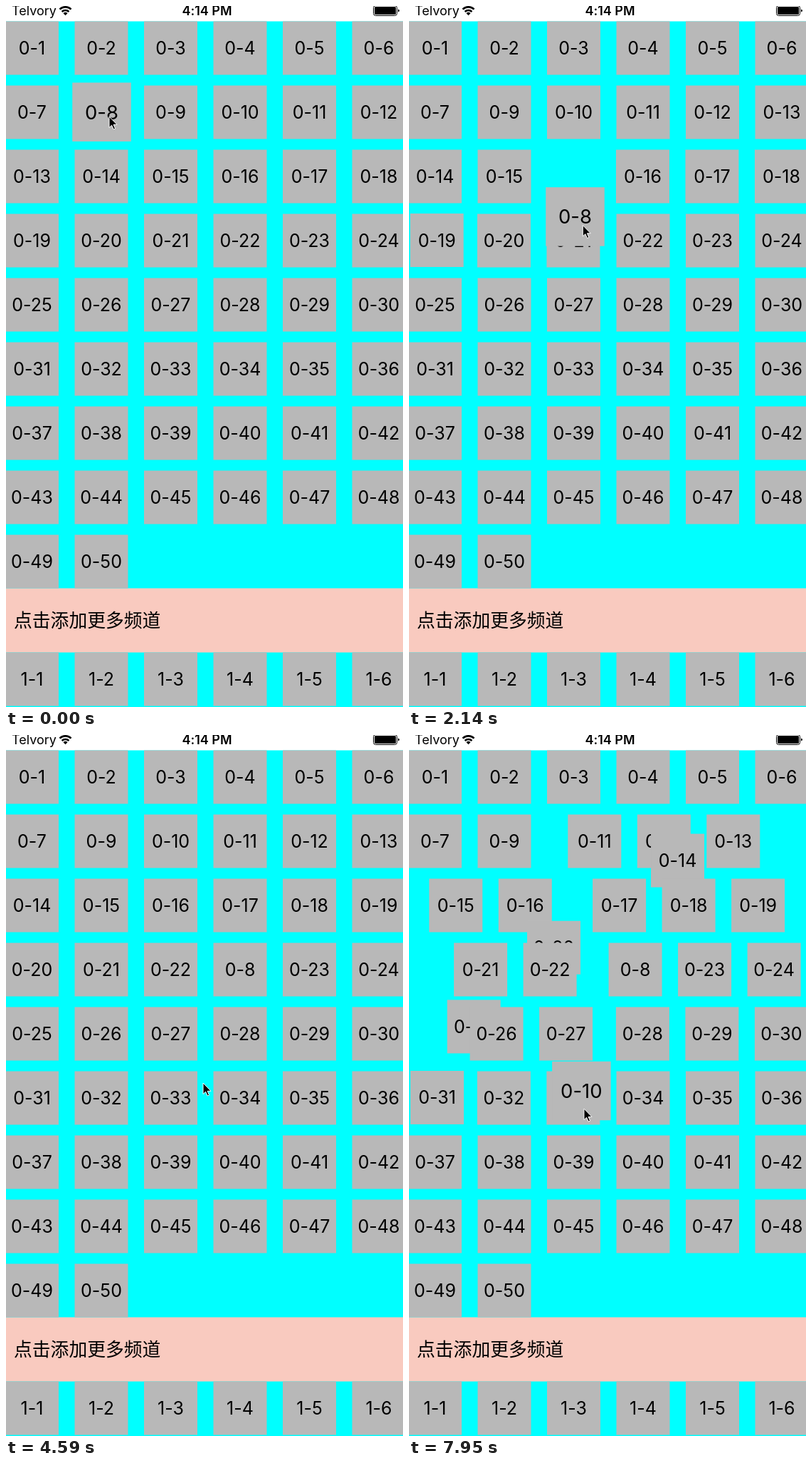
Animation of 558x983 px, one loop 8000 ms. Source, as an HTML page:

```html
<!DOCTYPE html>
<html lang="zh">
<head>
<meta charset="utf-8">
<title>Drag to reorder</title>
<style>
  html, body { margin: 0; width: 100%; height: 100%; overflow: hidden; background: #0ff; }
  svg { display: block; width: 558px; height: 983px; }
  text { font-family: Inter, Roboto, sans-serif; font-feature-settings: "calt" 0; }
  .cell rect { fill: #b8b8b8; }
  .cell text { font-size: 25px; text-anchor: middle; }
  .status { font-size: 18px; }
  .clock { font-weight: 600; text-anchor: middle; }
  .header { font: 25.8px "Noto Sans CJK SC", "Noto Sans CJK", sans-serif; }
</style>
</head>
<body>
<svg viewBox="0 0 558 983">
  <rect width="558" height="983" fill="#0ff"/>
  <rect width="558" height="21.5" fill="#fff"/>
  <text class="status" x="8" y="13">Telvory</text>
  <g fill="none" stroke="#000" stroke-width="2.6">
    <path d="M75.5 4.6a11.5 11.5 0 0 1 16 0M78.6 8a7 7 0 0 1 9.8 0"/>
    <path d="M83.5 13.2l-3-3a4.3 4.3 0 0 1 6 0z" fill="#000" stroke="none"/>
  </g>
  <text class="status clock" x="282.5" y="13">4:14 PM</text>
  <rect x="516.5" y="-.5" width="33" height="14" rx="3" fill="#fff" stroke="#000"/>
  <rect x="518" y="1" width="30" height="11" rx="1.5"/>
  <path d="M551 4.5q2 .5 2 2t-2 2z"/>
  <rect y="816.5" width="558" height="90" fill="#f9cabf"/>
  <text class="header" x="11" y="871">点击添加更多频道</text>
  <g id="extra"></g>
  <g id="grid"></g>
  <path id="cursor" d="M0 0V15.5L3.6 12.2 6.2 18 8.6 17 6.1 11.3H11Z" stroke="#fff"/>
</svg>
<script>
const LOOP = 8000, LAST_CHANGE = 7950, SHIFT = 300, GRIP = 250, LAG = 25;
const COLS = 6, HALF = 37.5;
const grid = document.getElementById('grid');
const extra = document.getElementById('extra');
const cursor = document.getElementById('cursor');

// Strokes of the hand: each leaves from where the previous one ended
const home = [145, 155];
const strokes = [
  { from: 120, until: 840, to: [262.5, 159] },
  { from: 880, until: 1668, to: [242, 255] },
  { from: 1800, until: 2430, to: [246, 348] },
  { from: 2690, until: 2900, to: [307.5, 338.5] },
  { from: 3830, until: 4590, to: [277, 488] },
  { from: 4600, until: 4820, to: [249.5, 600] },
  { from: 5160, until: 5380, to: [292, 400] },
  { from: 5380, until: 5570, to: [275, 218] },
  { from: 5590, until: 6150, to: [234, 140] },
  { from: 7650, until: 8050, to: [248, 590] }
];

// A held cell follows the pointer at a fixed offset, slightly late
const holds = [
  { id: 8, up: -LOOP, drop: 3840, offset: [-10.5, -6.3] },
  { id: 10, up: 7170, drop: LOOP, offset: [-2.5, 9] }
];

const clamp = v => Math.min(1, Math.max(0, v));
const mix = (a, b, k) => a + (b - a) * k;
const mixPoint = (a, b, k) => [mix(a[0], b[0], k), mix(a[1], b[1], k)];
const slotPoint = i => [36.5 + 97.5 * (i % COLS), 59 + 90 * Math.floor(i / COLS)];
const sway = v => (1 - Math.cos(Math.PI * clamp(v))) / 2;

// cubic-bezier(.42, 0, .58, 1)
function ease(v) {
  const x = clamp(v);
  let lo = 0, hi = 1;
  for (let i = 0; i < 18; i++) {
    const s = (lo + hi) / 2, r = 1 - s;
    if (1.26 * r * r * s + 1.74 * r * s * s + s ** 3 < x) lo = s; else hi = s;
  }
  return x === 0 || x === 1 ? x : lo * lo * (3 - 2 * lo);
}

const pointer = t => strokes.reduce(
  (point, { from, until, to }) => mixPoint(point, to, sway((t - from) / (until - from))), home);

function heldPoint({ drop, offset }, t) {
  const [x, y] = pointer(Math.min(t, drop) - LAG);
  return [x + offset[0], y + offset[1]];
}

function place(node, [x, y], scale = 1) {
  node.setAttribute('transform', `translate(${x.toFixed(2)} ${y.toFixed(2)}) scale(${scale.toFixed(4)})`);
}

function makeCell(parent, label, point) {
  const g = document.createElementNS('http://www.w3.org/2000/svg', 'g');
  g.setAttribute('class', 'cell');
  g.innerHTML = `<rect x="-37.5" y="-37.5" width="75" height="75"/><text y="9">${label}</text>`;
  place(g, point);
  parent.append(g);
  return g;
}

const cells = Array.from({ length: 50 }, (_, i) => ({
  start: i, shifts: [], node: makeCell(grid, `0-${i + 1}`, slotPoint(i))
}));
for (let c = 0; c < COLS; c++) makeCell(extra, `1-${c + 1}`, [slotPoint(c)[0], 944]);

function slotAt([x, y]) {
  return cells.findIndex((_, i) => {
    const [cx, cy] = slotPoint(i);
    return Math.abs(x - cx) <= HALF && Math.abs(y - cy) <= HALF;
  });
}

// A held cell takes over each slot its centre enters; the cells between make room
const order = cells.slice();
for (const hold of holds) {
  const held = cells[hold.id - 1];
  const end = Math.min(hold.drop, LAST_CHANGE);
  for (let time = Math.max(hold.up, 0); time < end; time++) {
    const from = order.indexOf(held), to = slotAt(heldPoint(hold, time));
    if (to < 0 || to === from) continue;
    order.splice(to, 0, order.splice(from, 1)[0]);
    for (let i = Math.min(from, to); i <= Math.max(from, to); i++) {
      order[i].shifts.push({ time, to: i });
    }
  }
}

const restPoint = (cell, t) => cell.shifts.reduce(
  (point, { time, to }) => mixPoint(point, slotPoint(to), ease((t - time) / SHIFT)),
  slotPoint(cell.start));

let front;
function raise(cell) {
  if (cell === front) return;
  front = cell;
  grid.append(...cells.map(c => c.node));
  if (cell) grid.append(cell.node);
}

function draw(t) {
  const hold = holds.find(h => t >= h.up && t < h.drop + GRIP);
  raise(hold && cells[hold.id - 1]);
  for (const cell of cells) {
    const rest = restPoint(cell, t);
    if (cell !== front) { place(cell.node, rest); continue; }
    const grip = 1 - ease((t - hold.drop) / GRIP);
    const lift = ease((t - hold.up) / GRIP) * grip;
    place(cell.node, mixPoint(rest, heldPoint(hold, t), grip), 1 + 0.1 * lift);
  }
  // Brief reddish flash on touch
  const touch = holds[1];
  const flash = t < touch.up ? 0 : 1 - clamp((t - touch.up - 20) / 130);
  const dim = mix(184, 166, flash);
  cells[touch.id - 1].node.firstChild.style.fill = `rgb(${mix(184, 188, flash)}, ${dim}, ${dim})`;
  place(cursor, pointer(t));
}

const began = performance.now();
function tick() {
  draw(Math.min((performance.now() - began) % LOOP, LAST_CHANGE));
  requestAnimationFrame(tick);
}
tick();
</script>
</body>
</html>
```
